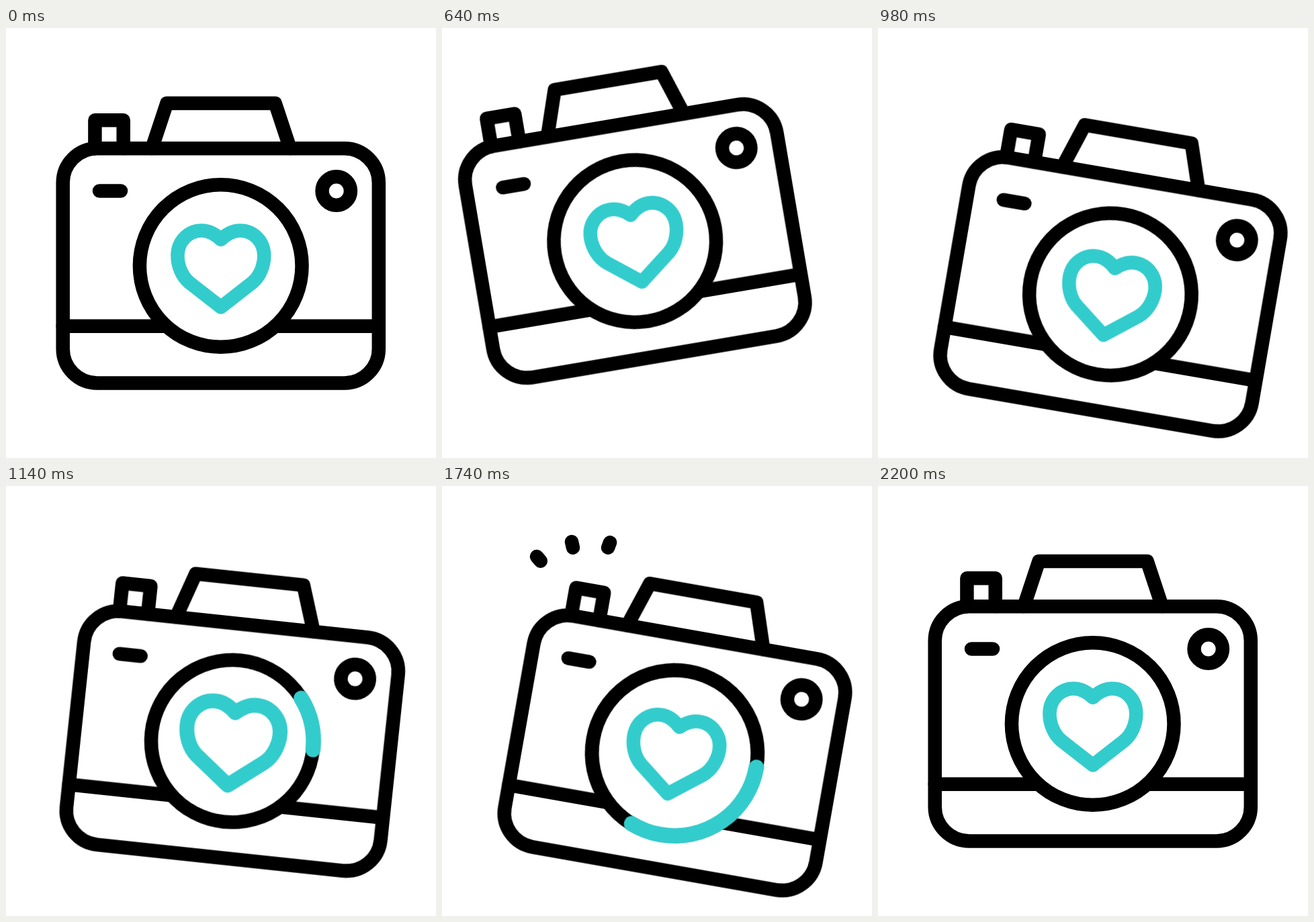
An HTML page for the animation above (2.4 s loop, 640x640 px).

```html
<!DOCTYPE html>
<html lang="en">
<head>
<meta charset="utf-8">
<title>Camera</title>
<style>
  @property --head { syntax: "<number>"; inherits: false; initial-value: 0; }
  @property --tail { syntax: "<number>"; inherits: false; initial-value: 0; }

  html, body { margin: 0; width: 100%; height: 100%; overflow: hidden; background: #fff; }
  svg { display: block; width: 100%; height: 100%; }

  svg * {
    animation-duration: 2400ms;
    animation-iteration-count: infinite;
    animation-timing-function: cubic-bezier(.3333, 0, .6667, 1);
  }

  .ink { fill: none; stroke: #000; stroke-width: 20.5; stroke-linecap: round; stroke-linejoin: round; }
  .teal { stroke: #33cccc; }

  .camera { transform-origin: 84.7px 528.5px; animation-name: swing; }
  .lens { transform-origin: 319.7px 354px; animation-name: zoom; }
  .heart { transform-origin: 319.8px 358.5px; animation-name: beat; }

  /* A stroke drawn between --tail and --head along its path */
  .trim {
    stroke-dasharray: calc((var(--head) - var(--tail)) * 1px) 1000px;
    stroke-dashoffset: calc(var(--tail) * -1px);
  }
  .ring { stroke-width: 22.5; animation-name: ring-head, ring-tail, ring-show; }
  .spark { animation-name: spark-head, spark-tail, spark-show; }

  @keyframes swing {
    0%, 8.3333% { transform: rotate(0deg); }
    29.1667% { transform: rotate(-10deg); }
    41.6667% { transform: rotate(10deg); }
    50% { transform: rotate(5deg); }
    58.3333%, 75% { transform: rotate(10deg); }
    91.6667%, 100% { transform: rotate(0deg); }
  }
  @keyframes zoom {
    0%, 54.1667% { transform: scale(1); }
    62.5% { transform: scale(.9); }
    66.6667% { transform: scale(1.1); }
    75%, 100% { transform: scale(1); }
  }
  @keyframes beat {
    0%, 8.3333%, 25%, 41.6667%, 58.3333%, 100% { transform: scale(1); }
    16.6667%, 50% { transform: scale(1.1); }
  }
  @keyframes ring-head {
    0%, 41.6667% { --head: 0; }
    70.8333%, 100% { --head: 360; }
  }
  @keyframes ring-tail {
    0%, 54.1667% { --tail: 0; }
    83.3333%, 100% { --tail: 360; }
  }
  @keyframes ring-show {
    0% { opacity: 0; animation-timing-function: step-end; }
    42% { opacity: 1; animation-timing-function: step-end; }
    83.2%, 100% { opacity: 0; }
  }
  @keyframes spark-head {
    0%, 62.5% { --head: 0; }
    70.8333%, 100% { --head: 100; }
  }
  @keyframes spark-tail {
    0%, 66.6667% { --tail: 0; }
    75%, 100% { --tail: 100; }
  }
  @keyframes spark-show {
    0% { opacity: 0; animation-timing-function: step-end; }
    62.9% { opacity: 1; animation-timing-function: step-end; }
    74.8%, 100% { opacity: 0; }
  }
</style>
</head>
<body>
<svg viewBox="0 0 640 640">
  <g class="ink">
    <path class="trim spark" pathLength="100" d="M168.8 137.4L141 105"/>
    <path class="trim spark" pathLength="100" d="M202.3 124.7L193 83"/>
    <path class="trim spark" pathLength="100" d="M236 121L250 84"/>

    <g class="camera">
      <rect x="84.7" y="179.2" width="470.1" height="349.3" rx="51"/>
      <path d="M217.2 179L239.4 112H400.6L422.8 179"/>
      <path d="M132.4 179V137.3H174.7V179"/>
      <path d="M139 242.5H171"/>
      <circle cx="491.7" cy="242.5" r="21.2"/>
      <path d="M84.7 443.7H265M375 443.7H554.8"/>

      <g class="lens">
        <circle cx="319.7" cy="354" r="120.8" fill="#fff"/>
        <path class="teal trim ring" pathLength="360"
              d="M440.5 354A120.8 120.8 0 0 0 198.9 354A120.8 120.8 0 0 0 440.5 354"/>
      </g>

      <path class="teal heart"
            d="M319.8 315C311 306.5 302 301.6 291.3 301.6C271 301.6 255.4 318 255.4 339
               C255.4 354 262 370 273 379L319.8 415.5L366.6 379C377.6 370 384.2 354 384.2 339
               C384.2 318 368.6 301.6 348.3 301.6C337.6 301.6 328.6 306.5 319.8 315Z"/>
    </g>
  </g>
</svg>
</body>
</html>
```
